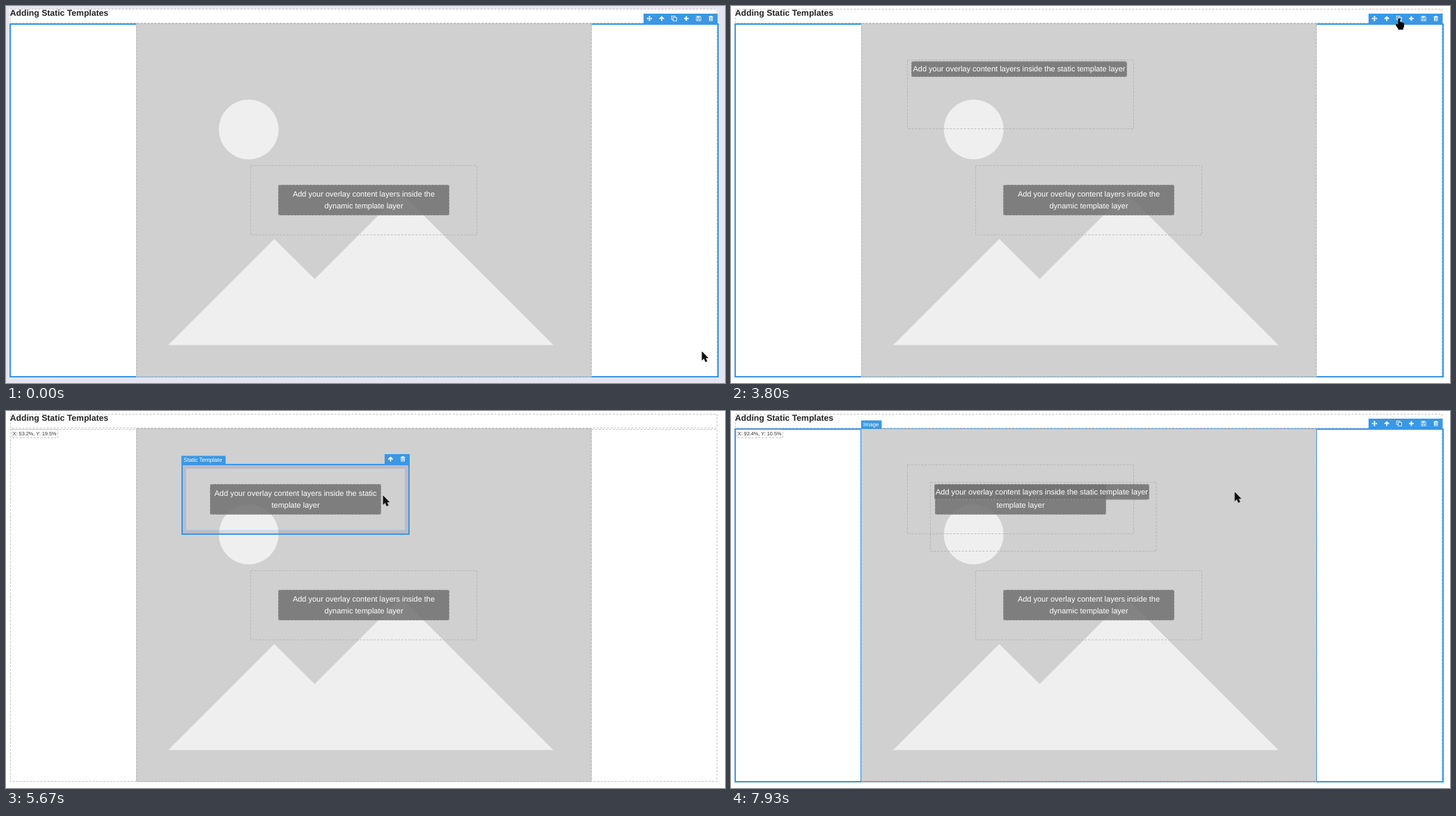
An HTML page for the animation above (8000 ms loop, 1033 by 542 pixels).

```html
<!DOCTYPE html>
<html lang="en">
<head>
<meta charset="utf-8">
<title>Adding Static Templates</title>
<style>
  html, body { margin: 0; width: 100%; height: 100%; overflow: hidden; background: #fff; }
  svg { display: block; width: 1033px; height: 542px; }
  text { font-family: "Liberation Sans", Arial, sans-serif; text-rendering: geometricPrecision; white-space: pre; }
  .dash { fill: none; stroke: #aaa; stroke-opacity: .7; stroke-dasharray: 3 2; }
  .blue { fill: #3b97e3; }
  .line { fill: none; stroke: #3b97e3; }
  .icon { fill: #fff; stroke: none; }
  .tint { fill: #000080; fill-opacity: .1; fill-rule: evenodd; }
  .note { font-size: 11px; fill: #fff; text-anchor: middle; }
  .tag { font-size: 8.15px; fill: #fff; }
</style>
</head>
<body>
<svg id="stage" viewBox="0 0 1033 542" xmlns="http://www.w3.org/2000/svg"></svg>
<script>
const LOOP = 8000, TICK = 1000 / 15;
const IMG = { x: 187, y: 26, w: 654, h: 507 };
const TPL = { x: 253, y: 77, w: 326, h: 100 };

// Cursor path: tick, x, y
const PATH = [
  [0, 1000, 497], [5, 1012, 316], [17, 1012, 316], [28, 968, 26], [30, 968, 26],
  [31, 977, 24], [34, 977, 22], [36, 977, 22], [38, 975, 18], [56, 975, 18],
  [57, 960, 18], [65, 467, 127], [77, 467, 127], [86, 545, 122], [87, 545, 122],
  [91, 899, 108], [97, 899, 108], [109, 978, 19], [110, 978, 19], [114, 970, 18],
  [116, 970, 18], [117, 905, 34], [118, 791, 77], [119, 724, 117]
];

const rect = (x, y, w, h, attrs) => `<rect x="${x}" y="${y}" width="${w}" height="${h}" ${attrs}/>`;
const dash = (x, y, w, h) => rect(x + .5, y + .5, w - 1, h - 1, 'class="dash"');
const group = (id, body) => `<g id="${id}">${body}</g>`;

// Dark rounded box with centred lines of text
function note(x, y, w, h, lines) {
  const first = y + h / 2 + 3.9 - (lines.length - 1) * 8.25 - .5;
  const text = lines.map((s, i) =>
    `<text class="note" x="${x + w / 2}" y="${first + i * 16.4}">${s}</text>`).join('');
  return rect(x, y, w, h, 'rx="3" fill="#727272" fill-opacity=".86"') +
    rect(x + .5, y + .5, w - 1, h - 1, 'rx="2.5" class="dash"') + text;
}

function tag(id, x, y, w, label) {
  return group(id, rect(x, y, w, 12, 'class="blue"') +
    `<text class="tag" x="${x + 3}" y="${y + 8.7}">${label}</text>`);
}

const ICONS = {
  move: 'M0-4 1.7-2.2H.6V-.6H2.2V-1.7L4 0 2.2 1.7V.6H.6V2.2H1.7L0 4-1.7 2.2H-.6V.6H-2.2V1.7L-4 0-2.2-1.7V-.6H-.6V-2.2H-1.7Z',
  up: 'M0-3.6 3.7 .1 2.6 1.2 .9-.4V3.5H-.9V-.4L-2.6 1.2-3.7 .1Z',
  copy: 'M-4-4H1.7V-2H4V4H-1.7V1.8H-4ZM-3.2-3.2V1H-1.7V-2H.9V-3.2ZM-.9-1.2V3.2H3.2V-1.2Z',
  plus: 'M-1-3.2H1V-1H3.2V1H1V3.2H-1V1H-3.2V-1H-1Z',
  save: 'M-3.5-3.5H2.2L3.5-2.2V3.5H-3.5ZM-2.8-2.8V2.8H-2V.5H2V2.8H2.8V-2L2-2.8H1.7V-.8H-1.9V-2.8ZM.2-2.6V-1.3H1.1V-2.6ZM-1.3 1.2V2.8H1.3V1.2Z',
  trash: 'M-1.3-3.8H1.3L1.7-2.8H3.3V-2H2.7V3.6H-2.7V-2H-3.3V-2.8H-1.7ZM-1.8-1.5V2.8H1.8V-1.5ZM-1.3-1H-.7V2.3H-1.3ZM-.3-1H.3V2.3H-.3ZM.7-1H1.3V2.3H.7Z'
};

function toolbar(id, x, y, w, names) {
  const icons = names.map((name, i) =>
    `<path class="icon" fill-rule="evenodd" transform="translate(${x + 8.5 + i * 17.65} ${y + 7})" d="${ICONS[name]}"/>`).join('');
  return group(id, rect(x, y, w, 14, 'class="blue"') + icons);
}

const LINE = 'Add your overlay content layers inside the static template layer';
const svg = document.getElementById('stage');
svg.innerHTML =
  rect(0, 0, 1033, 542, 'fill="#fff"') +
  '<path id="pageTint" class="tint" d="M0 0H1033V542H0ZM5 4V534H1023V4Z"/>' +
  dash(6, 4, 1016, 21) +
  '<text x="5.8" y="13.6" font-size="12.2" font-weight="700" fill="#222">Adding Static Templates</text>' +
  dash(6, 26, 1016, 507) +
  rect(6, 26, 1017, 507, 'id="mapLine" class="line"') +
  rect(187, 25, 654.5, 508.5, 'fill="#d0d0d0"') +
  '<circle cx="348.7" cy="177.5" r="43" fill="#efefef"/>' +
  '<path d="M233 487.5 385.5 335 443.5 392.5 567.5 268.5 786.5 487.5Z" fill="#efefef"/>' +
  rect(186.5, 25.5, 655, 507, 'id="imgLine" class="line"') +
  dash(187, 25, 654.5, 508) +
  dash(351, 229, 326, 100.5) +
  note(391, 257, 246, 44, ['Add your overlay content layers inside the', 'dynamic template layer']) +
  group('tpl', dash(TPL.x, TPL.y, TPL.w, TPL.h) +
    group('wide', note(259, 79.5, 310, 22.5, [LINE])) +
    group('wrapped', note(293, 105, 246, 44,
      ['Add your overlay content layers inside the static', 'template layer']))) +
  group('added', dash(286, 102, 325.5, 100) + note(292, 105, 309, 22.5, [LINE])) +
  '<path id="tplTint" class="tint" d="M253 77H579V177H253ZM259 83V171H573V83Z"/>' +
  rect(253, 77, 326, 100, 'id="tplLine" class="line"') +
  group('coords', dash(8, 26, 67, 13) +
    '<text id="coordText" x="9.7" y="35.2" font-size="7.3" fill="#333"></text>') +
  toolbar('mapBar', 916, 11, 106.5, ['move', 'up', 'copy', 'plus', 'save', 'trash']) +
  toolbar('tplBar', 544, 62, 36, ['up', 'trash']) +
  tag('mapTag', 6, 14, 47, 'Image Map') +
  tag('imgTag', 187, 13.5, 29.5, 'Image') +
  tag('tplTag', 252, 64.5, 63.5, 'Static Template') +
  '<path id="arrow" d="M0 0V12.2L2.8 9.6 5 14.6 7.2 13.6 5 8.9H8.6Z" fill="#111" stroke="#111" stroke-width=".7"/>' +
  '<path id="hand" d="M-1.6 1.2Q-1.6 0 -.3 0T1.1 1.2V5.2Q2.4 4.6 3.2 5.6 4.6 5.1 5.2 6.2 7 5.8 7.1 7.6V10.5Q7 12.5 5.8 14V16H-1.6V14.4L-4.6 10.3Q-5.6 8.5-4.2 7.8-3-7.4-1.6 8.8Z" fill="#050505"/>';

// Keep the thumb of the hand inside its outline
document.getElementById('hand').setAttribute('d',
  'M-1.6 1.2Q-1.6 0-.3 0T1.1 1.2V5.2Q2.4 4.6 3.2 5.6 4.6 5.1 5.2 6.2 7 5.8 7.1 7.6V10.5Q7 12.5 5.8 14V16H-1.6V14.4L-4.6 10.3Q-5.6 8.5-4.2 7.8-3 7.4-1.6 8.8Z');

const el = {};
svg.querySelectorAll('[id]').forEach(node => { el[node.id] = node; });
const show = (id, on) => { el[id].style.display = on ? '' : 'none'; };

function cursorAt(n) {
  let i = 0;
  while (i < PATH.length - 2 && PATH[i + 1][0] <= n) i++;
  const [t0, x0, y0] = PATH[i], [t1, x1, y1] = PATH[i + 1];
  const u = Math.min(1, Math.max(0, (n - t0) / (t1 - t0)));
  const k = u * u * (3 - 2 * u);
  return { x: x0 + (x1 - x0) * k, y: y0 + (y1 - y0) * k };
}

const inside = (p, b) => p.x >= b.x && p.x <= b.x + b.w && p.y >= b.y && p.y <= b.y + b.h;

function hoverAt(n, p) {
  if (n >= 31 && n < 34) return 'map';
  if (n < 60 || p.y < IMG.y) return '';
  if (inside(p, TPL)) return 'tpl';
  return inside(p, IMG) ? 'img' : 'map';
}

function outline(id, selected, hovered) {
  show(id, selected || hovered);
  el[id].setAttribute('stroke-width', selected ? 2 : 1);
}

function draw(n) {
  const p = cursorAt(n), hover = hoverAt(n, p);
  const tplSelected = n >= 77 && n < 97, tplBar = n >= 78 && n < 98;

  el.pageTint.style.opacity = Math.max(0, 1 - n / 5);
  outline('mapLine', !tplSelected, hover === 'map');
  outline('tplLine', tplSelected, hover === 'tpl');
  show('imgLine', hover === 'img');
  show('tplTint', hover === 'tpl');

  show('tpl', n >= 40);
  show('wide', n < 77);
  show('wrapped', n >= 77);
  show('added', n >= 112);

  show('mapBar', !tplBar);
  show('tplBar', tplBar);
  for (const name of ['map', 'img', 'tpl']) show(name + 'Tag', hover === name);

  // The readout trails the pointer by one tick
  const q = cursorAt(n - 1);
  const px = (q.x - IMG.x) / IMG.w * 100, py = (q.y + 2 - IMG.y) / IMG.h * 100;
  show('coords', hover === 'img' || hover === 'tpl');
  el.coordText.textContent = `X: ${px.toFixed(1)}%, Y: ${py.toFixed(1)}%`;

  const hand = n >= 31 && p.y < IMG.y;
  const at = `translate(${Math.round(p.x)} ${Math.round(p.y)})`;
  show('hand', hand);
  show('arrow', !hand);
  el.hand.setAttribute('transform', at);
  el.arrow.setAttribute('transform', at);
  el.arrow.setAttribute('fill', n === 77 ? '#c4c4c4' : '#111');
}

const start = performance.now();
function frame() {
  const t = (performance.now() - start) % LOOP;
  draw(Math.min(119, Math.floor((t + 4) / TICK)));
  requestAnimationFrame(frame);
}
frame();
</script>
</body>
</html>
```
